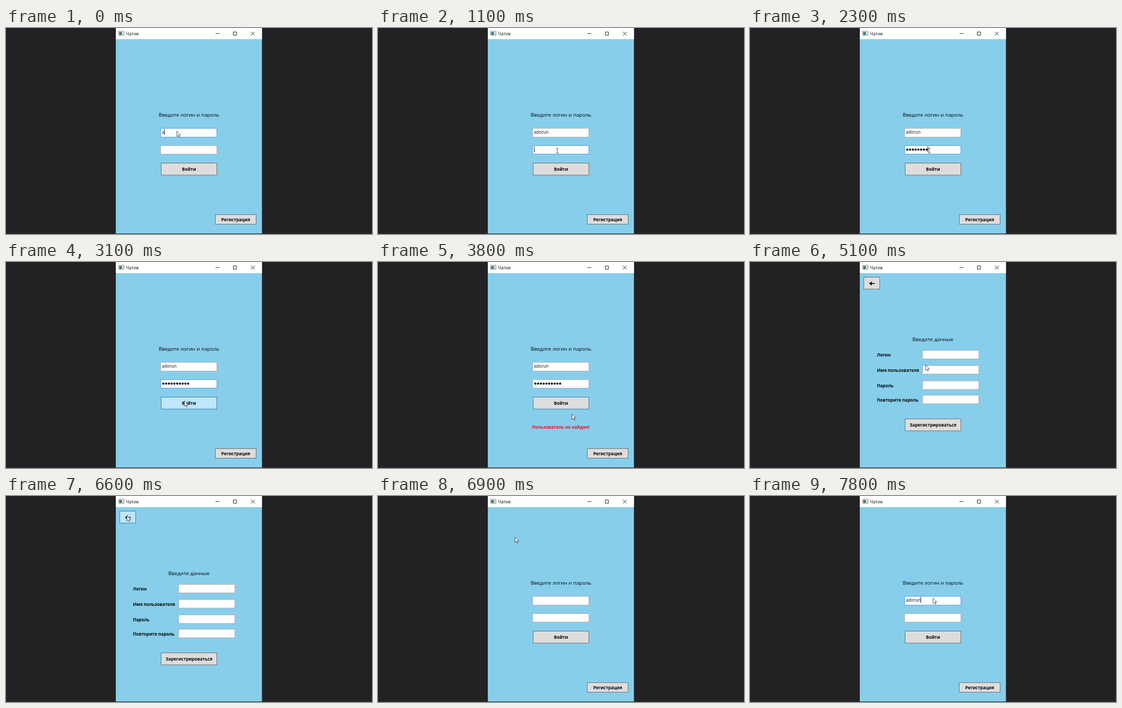
Animation of 690x388 px, one loop 8000 ms. Source, as an HTML page:

```html
<!DOCTYPE html>
<html lang="ru">
<head>
<meta charset="utf-8">
<title>Чатик</title>
<style>
  html, body { margin: 0; width: 100%; height: 100%; overflow: hidden; background: #222224; }
  svg { display: block; width: 690px; height: 388px; }
  text { font-family: "Open Sans", "Noto Sans", sans-serif; font-size: 8.1px; fill: #0a0a0a; }
  .bold { font-weight: 700; }
  .head { font-size: 9.7px; font-weight: 500; }
  .mid { text-anchor: middle; }
</style>
</head>
<body>
<svg id="stage" viewBox="0 0 690 388"></svg>
<script>
const LOOP = 8000, STEP = 100;
const LOGIN = "adorun";
const BLUE = "#3c7fb1";
const stage = document.getElementById("stage");

function add(parent, tag, attrs, text) {
  const el = document.createElementNS("http://www.w3.org/2000/svg", tag);
  for (const k in attrs) el.setAttribute(k, attrs[k]);
  if (text) el.textContent = text;
  parent.appendChild(el);
  return el;
}
const set = (el, attrs) => { for (const k in attrs) el.setAttribute(k, attrs[k]); };
const show = (el, on) => el.setAttribute("visibility", on ? "inherit" : "hidden");
const label = (parent, x, y, text, cls) => add(parent, "text", { x, y, class: cls }, text);

function box(parent, x, y, width, height, fill) {
  const el = add(parent, "rect", { x, y, width, height, fill, stroke: "#abadb3" });
  return { parent, el, x, y, width, height };
}
const field = (parent, x, y, h) => box(parent, x, y, 106, h, "#fff");
function button(parent, x, y, w, h, text) {
  const b = box(parent, x, y, w, h, "#ddd");
  if (text) label(parent, x + w / 2, y + h / 2 + 3.1, text, "bold mid");
  return b;
}

// Window frame
add(stage, "rect", { width: 690, height: 388, fill: "#222224" });
add(stage, "rect", { y: 386, width: 690, height: 2, fill: "#2a2a2c" });
add(stage, "rect", { x: 207, width: 275.5, height: 387, fill: "#87ceeb" });
add(stage, "rect", { x: 207, width: 275.5, height: 21, fill: "#fff" });
add(stage, "rect", { x: 212.5, y: 6, width: 10, height: 8, fill: "#f4f6f7", stroke: "#858a8e", "stroke-width": 0.9 });
add(stage, "rect", { x: 213.5, y: 7.5, width: 5, height: 5.5, fill: "#3d7670" });
add(stage, "rect", { x: 219.7, y: 7.5, width: 1.8, height: 5.5, fill: "#c4ccd0" });
label(stage, 226.3, 13.6, "Чатик").style.fontSize = "8.5px";
add(stage, "path", { d: "M395 10.5h7M428.5 7.5h6v6h-6zM461.7 7l7 7m0-7l-7 7", fill: "none", stroke: "#222", "stroke-width": 0.95 });

// Sign-in page
const signIn = add(stage, "g", {});
label(signIn, 345, 166.6, "Введите логин и пароль", "head mid");
const loginBox = field(signIn, 291.5, 189, 16.5);
const passBox = field(signIn, 291.5, 221.5, 16);
const enter = button(signIn, 292.5, 254.5, 105, 22.5, "Войти");
const toReg = button(signIn, 394.5, 351.5, 77, 18, "Регистрация");
const typed = label(signIn, 293.8, 198.6, LOGIN);
const dots = Array.from({ length: 10 }, (_, i) =>
  add(signIn, "circle", { cx: 296.6 + 5.2 * i, cy: 229, r: 2.05, fill: "#0a0a0a" }));
const error = label(signIn, 344.5, 313.8, "Пользователь не найден!", "bold mid");
error.style.fill = "#f8101c";
const caret = add(signIn, "rect", { width: 0.9, height: 11.5, fill: "#111" });

// Sign-up page
const signUp = add(stage, "g", {});
const back = button(signUp, 214.5, 28.5, 30, 22.5);
add(signUp, "path", { d: "M235.3 40.5H226M229 37.8L225.4 40.5l3.6 2.7z", fill: "#0a0a0a", stroke: "#0a0a0a", "stroke-width": 1.3 });
label(signUp, 344.7, 148.6, "Введите данные", "head mid");
const rows = [["Логин", 166.5], ["Имя пользователя", 195], ["Пароль", 224], ["Повторите пароль", 251]]
  .map(([text, y]) => {
    label(signUp, 239.2, y + 11.7, text, "bold");
    return field(signUp, 325.3, y, 16);
  });
const create = button(signUp, 292.5, 295.5, 105, 22.5, "Зарегистрироваться");

const arrow = add(stage, "path", {
  d: "M0 0V10.2L2.4 8L4 11.7L5.6 11L4 7.4H7.2Z", fill: "#fff", stroke: "#333", "stroke-width": 0.8 });
const beam = add(stage, "path", {
  d: "M-1.8 -4.5H1.8M0 -4.5V4.5M-1.8 4.5H1.8", fill: "none", stroke: "#333", "stroke-width": 0.9 });

const fields = [loginBox, passBox, ...rows];
const buttons = [enter, toReg, back, create];

// Pointer stops: time, x, y
const PATH = [
  [0, 322, 194.3], [600, 322, 194.3], [1000, 338, 231], [2500, 338, 231],
  [2900, 336.3, 261.5], [3600, 336.3, 261.5], [4200, 449, 356.5], [4700, 449, 356.5],
  [5100, 331, 193.8], [5400, 340, 203], [5800, 365, 262], [5950, 349, 304],
  [6050, 345, 303], [6300, 231.5, 55.5], [6500, 228, 36.8], [6800, 228, 36.8],
  [7100, 345, 192.3], [LOOP, 345, 192.3]
];
function pointer(t) {
  const i = PATH.findIndex(p => p[0] > t);
  const a = PATH[i - 1], b = PATH[i];
  const u = (t - a[0]) / (b[0] - a[0]), e = u * u * (3 - 2 * u);
  return [a[1] + (b[1] - a[1]) * e, a[2] + (b[2] - a[2]) * e];
}

const between = (t, a, b) => t >= a && t < b;
const clamp = (v, max) => Math.max(0, Math.min(max, Math.floor(v)));
const loginCount = t =>
  t < 6800 ? clamp(1 + t / 100, 6) : t < 7400 ? 0 : clamp(1 + (t - 7400) / 80, 6);
function passCount(t) {
  if (t < 1400 || t >= 6800) return 0;
  return t < 2400 ? clamp(1 + (t - 1400) / 100, 8) : clamp(9 + (t - 2400) / 100, 10);
}

function draw(t) {
  const [x, y] = pointer(t);
  const page = between(t, 4700, 6800) ? signUp : signIn;
  const over = b => b.parent === page &&
    x >= b.x && x <= b.x + b.width && y >= b.y && y <= b.y + b.height;
  const focus = t < 1000 || t >= 7100 ? loginBox
    : t < 3200 ? passBox : t < 4600 ? enter : null;
  const press = between(t, 3200, 3300) || between(t, 4600, 4700) || between(t, 6700, 6800);

  show(signIn, page === signIn);
  show(signUp, page === signUp);
  for (const f of fields)
    set(f.el, { stroke: f === focus ? "#569de5" : over(f) ? "#7eb4ea" : "#abadb3" });
  for (const b of buttons) {
    const hot = over(b);
    set(b.el, {
      fill: hot ? (press ? "#c4e5f6" : "#bee6fd") : "#ddd",
      stroke: hot && press ? "#2c628b" : hot || b === focus ? BLUE : "#707070"
    });
  }

  const n = loginCount(t), m = passCount(t);
  typed.textContent = LOGIN.slice(0, n);
  dots.forEach((d, i) => show(d, i < m));
  show(error, between(t, 3600, 4700));

  const inLogin = focus === loginBox;
  const lastKey = inLogin ? t : t < 1400 ? 1000 : Math.min(t, 2500);
  show(caret, page === signIn && (inLogin || focus === passBox) && (t - lastKey) % 1060 < 530);
  set(caret, inLogin
    ? { x: 293.9 + (n ? typed.getComputedTextLength() : 0), y: 189.8 }
    : { x: 294 + 5.2 * m - (m ? 0.7 : 0), y: 222.5 });

  // Typing a login turns the text pointer back into an arrow
  const typing = t <= 600 || t >= 7400;
  const text = !typing && fields.some(over);
  const move = `translate(${x} ${y})`;
  set(arrow, { transform: move });
  set(beam, { transform: move });
  show(arrow, !text);
  show(beam, text);
}

const start = performance.now();
function tick() {
  const t = (performance.now() - start) % LOOP;
  draw(Math.floor(t / STEP) * STEP);
  requestAnimationFrame(tick);
}
tick();
</script>
</body>
</html>
```
